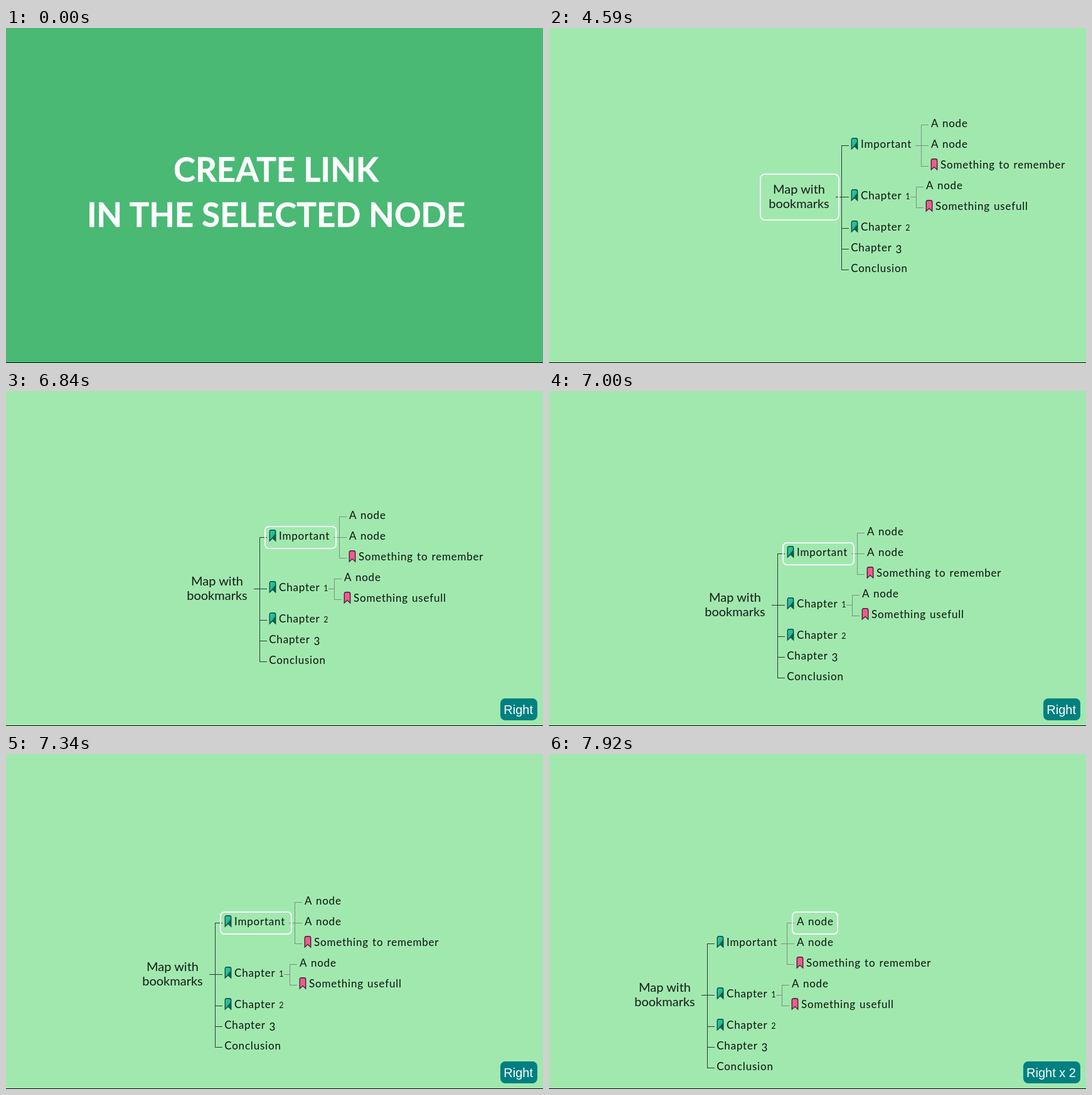
Animation of 856x534 px, one loop 8000 ms. Source, as an HTML page:

```html
<!DOCTYPE html>
<html lang="en">
<head>
<meta charset="utf-8">
<title>Bookmark links</title>
<style>
  html, body { margin: 0; width: 100%; height: 100%; overflow: hidden; background: #000; }
  svg { display: block; }
  text { white-space: pre; }
  .title { font: 700 52.8px Lato, "Open Sans", sans-serif; fill: #fff; stroke: #fff; stroke-width: .5; text-anchor: middle; }
  .command { font-size: 57.4px; }
  .root { font: 400 20px Lato, "Open Sans", sans-serif; fill: #141c16; text-anchor: middle; }
  .node { font: 400 17px Lato, "Open Sans", sans-serif; fill: #0c120d; letter-spacing: .8px; word-spacing: 1px; }
  .small { font-size: 12.5px; }
  .trunk, .twig { fill: none; stroke: #2c3b30; shape-rendering: crispEdges; }
  .twig { stroke: #7d8f81; }
  .frame { fill: none; stroke: #f6fbf7; stroke-width: 2; }
  .key { font: 400 20px "Liberation Sans", Arial, sans-serif; fill: #fff; text-anchor: end; }
</style>
</head>
<body>
<svg width="856" height="534" viewBox="0 0 856 534">
  <defs>
    <linearGradient id="teal" x1="0" y1="0" x2="1" y2="1">
      <stop offset="0" stop-color="#2fd0a6"/>
      <stop offset="1" stop-color="#18a384"/>
    </linearGradient>
    <g id="ribbon">
      <path d="M.8 3.2Q.8 .8 3.2 .8H7.8Q10.2 .8 10.2 3.2V18L5.5 13.6L.8 18Z"/>
    </g>
    <g id="chapterMark">
      <use href="#ribbon" fill="url(#teal)" stroke="#0b4a3d" stroke-width="1.4"/>
      <path d="M1.4 16.6L9.6 6.4V16.6L5.5 12.6Z" fill="#0d5f4d"/>
    </g>
    <g id="noteMark">
      <use href="#ribbon" fill="#ec5c93" stroke="#4d1a30" stroke-width="1.4"/>
    </g>
  </defs>
  <rect id="back" width="856" height="533"/>
  <g id="heading">
    <text class="title" x="430.5" y="245">CREATE LINK</text>
    <text class="title" x="430.5" y="317">IN THE SELECTED NODE</text>
  </g>
  <g id="command">
    <text class="title command" x="430.5" y="241">Command</text>
    <text class="title command" x="430.5" y="312">Create link to bookmarked node</text>
  </g>
  <g id="map">
    <path class="trunk" d="M478 187.5H466.5V385.5H478M457 269.5H478M466 319.5H478M466 352.5H478"/>
    <path class="twig" d="M605 154.5H593.5V220.5H605M584 187.5H605M597 253.5H585.5V286.5H597M576 269.5H585"/>
    <text class="root" x="398.5" y="264">Map with</text>
    <text class="root" x="398.5" y="287">bookmarks</text>
    <g id="nodes"></g>
    <rect id="frame" class="frame"/>
  </g>
  <g id="badge">
    <rect id="badgeBox" y="490" height="35" rx="8" fill="#008080"/>
    <text id="badgeText" class="key" x="840" y="515"></text>
  </g>
</svg>
<script>
  const LOOP = 8000;
  const SPEED = 0.0179;
  const $ = id => document.getElementById(id);
  const SVG = "http://www.w3.org/2000/svg";

  function add(parent, tag, attrs, text = "") {
    const el = document.createElementNS(SVG, tag);
    setAll(el, attrs);
    el.textContent = text;
    parent.appendChild(el);
    return el;
  }

  function setAll(el, attrs) {
    for (const key in attrs) el.setAttribute(key, attrs[key]);
  }

  function show(el, on) {
    el.style.display = on ? "" : "none";
  }

  // left, baseline, label, bookmark
  const nodes = [
    [482, 191, "Important", "chapterMark"],
    [482, 273, "Chapter 1", "chapterMark"],
    [482, 323, "Chapter 2", "chapterMark"],
    [482, 356, "Chapter 3"],
    [482, 389, "Conclusion"],
    [609, 158, "A node"],
    [609, 191, "A node"],
    [609, 224, "Something to remember", "noteMark"],
    [601, 257, "A node"],
    [601, 290, "Something usefull", "noteMark"]
  ];

  // old-style figures: 1 and 2 are small, 3 hangs below the line
  function figure(digit) {
    return digit === "3" ? { dy: 3 } : { class: "small" };
  }

  for (const [x, y, label, mark] of nodes) {
    if (mark) add($("nodes"), "use", { href: "#" + mark, x: x - 0.5, y: y - 16 });
    const shift = mark ? 15 : label[0] === "A" ? 0 : -0.8;
    const [, word, digit] = label.match(/^(.*?)(\d?)$/);
    const text = add($("nodes"), "text", { class: "node", x: x + shift, y }, word);
    if (digit) add(text, "tspan", figure(digit), digit);
  }

  const frames = {
    root: { x: 337, y: 233, width: 125, height: 73, rx: 7 },
    important: { x: 475, y: 170, width: 113, height: 35, rx: 6 },
    child: { x: 602, y: 137, width: 72, height: 35, rx: 6 }
  };

  // the screen refreshes only at these times while scrolling
  const scrolls = [
    { start: 6667, dx: -133, dy: 82, ticks: [6750, 6840, 6920, 7000, 7090, 7170, 7250, 7340] },
    { start: 7622, dx: -106, dy: 33, ticks: [7670, 7750, 7840, 7920] }
  ];

  // speed falls with the square root of the distance left
  function travelled(distance, elapsed) {
    const root = Math.max(0, Math.sqrt(Math.abs(distance)) - SPEED * elapsed);
    return Math.round(Math.sign(distance) * (Math.abs(distance) - root * root));
  }

  function offset(t) {
    let x = 0, y = 0;
    for (const s of scrolls) {
      const tick = s.ticks.filter(v => v <= t).pop();
      if (tick === undefined) break;
      x += travelled(s.dx, tick - s.start);
      y += travelled(s.dy, tick - s.start);
    }
    return [x, y];
  }

  function draw(t) {
    const onMap = t >= 4590;
    const first = t >= 6750;
    const second = t >= 7670;
    $("back").setAttribute("fill", onMap ? "#a1e8af" : "#49b974");
    show($("heading"), t < 500);
    show($("command"), t >= 500 && !onMap);
    show($("map"), onMap);
    show($("badge"), first);
    $("map").setAttribute("transform", `translate(${offset(t)})`);
    setAll($("frame"), second ? frames.child : first ? frames.important : frames.root);
    setAll($("badgeBox"), second ? { x: 756, width: 91 } : { x: 788, width: 59 });
    $("badgeText").textContent = second ? "Right x 2" : "Right";
  }

  const begin = performance.now();
  function tick() {
    draw((performance.now() - begin) % LOOP);
    requestAnimationFrame(tick);
  }
  tick();
</script>
</body>
</html>
```
